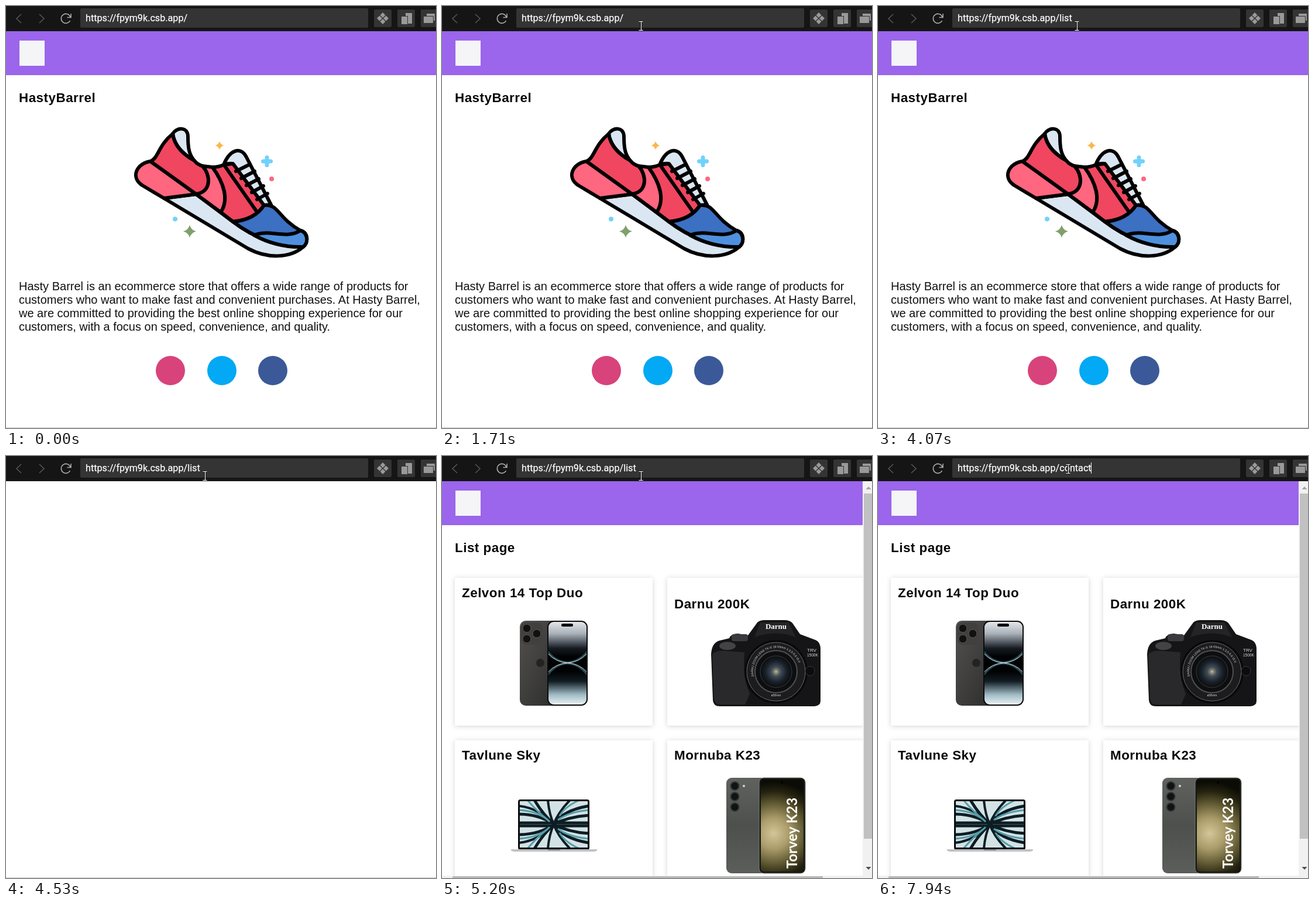
An HTML page that plays this animation: 735x720 px, repeating every 8000 ms.

```html
<!DOCTYPE html>
<html lang="en">
<head>
<meta charset="utf-8">
<title>Shop preview</title>
<style>
  html, body { margin: 0; width: 735px; height: 720px; overflow: hidden; background: #fff; }
  svg { display: block; }
  text { white-space: pre; }
  .head { font: bold 22.4px "Liberation Sans", Arial, sans-serif; letter-spacing: .5px; fill: #080808; }
  .body { font: 20px "Liberation Sans", Arial, sans-serif; fill: #111; }
  .url { font: 16.18px Roboto, sans-serif; fill: #fff; stroke: #fff; stroke-width: .25; }
  .ink { stroke: #000; stroke-width: 6; stroke-linejoin: round; stroke-linecap: round; }
  .card { fill: #fff; filter: drop-shadow(0 1px 4px rgba(0,0,0,.17)); }
</style>
</head>
<body>
<svg width="735" height="720" viewBox="0 0 735 720">
  <defs>
    <clipPath id="view"><path d="M0 43H719V716H0Z"/></clipPath>
    <clipPath id="phoneScreen"><rect x="182" y="283" width="65" height="141" rx="9"/></clipPath>
    <clipPath id="laptopScreen"><rect x="133" y="589" width="116" height="79"/></clipPath>
    <linearGradient id="graphite" x2="1" y2="1"><stop stop-color="#52514f"/><stop offset="1" stop-color="#2b2b2a"/></linearGradient>
    <linearGradient id="sage" x2="0" y2="1"><stop stop-color="#5f625f"/><stop offset=".5" stop-color="#4d504d"/><stop offset="1" stop-color="#5b5e5a"/></linearGradient>
    <linearGradient id="glow" x2="0" y2="1"><stop stop-color="#e3e6e9"/><stop offset=".14" stop-color="#aab2ba"/><stop offset=".32" stop-color="#161b22"/><stop offset=".42" stop-color="#010203"/><stop offset=".6" stop-color="#010203"/><stop offset=".72" stop-color="#121d24"/><stop offset=".88" stop-color="#9fbac4"/><stop offset="1" stop-color="#eaf2f4"/></linearGradient>
    <radialGradient id="olive" gradientUnits="userSpaceOnUse" cx="567" cy="644" r="88"><stop stop-color="#d5c598"/><stop offset=".3" stop-color="#aa9c6a"/><stop offset=".58" stop-color="#625b34"/><stop offset=".82" stop-color="#25230f"/><stop offset="1" stop-color="#0c0c06"/></radialGradient>
    <radialGradient id="lens"><stop stop-color="#d8c89a"/><stop offset=".1" stop-color="#8b8874"/><stop offset=".3" stop-color="#3e4c58"/><stop offset=".65" stop-color="#1b222a"/><stop offset="1" stop-color="#0b0c0e"/></radialGradient>
    <path id="ring" d="M533 376A40 40 0 1 1 611 376"/>
    <path id="spark" d="M0-1Q.2-.2 1 0Q.2.2 0 1Q-.2.2-1 0Q-.2-.2 0-1Z"/>
    <g id="feather" fill="none" stroke="#0d1d24">
      <path stroke-width="5" d="M133 626H249M131 611Q165 611 191 628Q218 615 251 613M158 587Q172 611 191 628Q208 604 251 597"/>
      <path stroke-width="4" d="M131 597Q164 600 191 628M181 587Q183 611 191 628Q199 607 219 587"/>
      <path stroke="#559da8" stroke-width="3" d="M131 604Q166 606 184 624M146 587Q162 606 181 621M198 621Q217 607 251 604M235 587Q210 598 201 614"/>
    </g>
  </defs>

  <g id="home">
    <path fill="#9b65ec" d="M0 43H735V118H0Z"/>
    <rect x="23" y="59" width="43" height="43" fill="#f5f5f7"/>
    <text class="head" x="22" y="164">HastyBarrel</text>

    <g class="ink">
      <path fill="#dae6f1" d="M270 328L325 321L388 368C426 397 465 410 508 411C485 431 446 431 414 414Z"/>
      <path fill="#ff667f" d="M247 265C225 268 211 291 233 306L270 328L325 321Z"/>
      <path fill="#dae6f1" d="M285 218C291 207 311 205 311 223C311 242 313 254 322 264C303 253 288 239 285 218Z"/>
      <path fill="#f04660" d="M247 265C261 259 260 238 285 218C288 240 304 254 322 264Q328 271 336 273C350 288 352 317 325 321Z"/>
      <path fill="#ff667f" d="M336 273L353 275C372 301 382 330 367 352L325 321C352 317 350 288 336 273Z"/>
      <path fill="#f04660" d="M353 275Q363 275 372 271L388 269L441 340C430 357 412 366 388 368L367 352C382 330 372 301 353 275Z"/>
      <path fill="#dae6f1" d="M372 271C382 246 401 238 411 258L453 339L441 340L388 269Q380 268 372 271Z"/>
      <path fill="#3c70c3" d="M388 368C412 366 430 357 441 340C466 337 464 361 503 383C517 386 517 404 508 411C465 410 426 397 388 368Z"/>
      <path fill="#4f90de" d="M424 391C450 380 480 399 503 383C517 387 517 404 508 411C475 412 446 403 424 391Z"/>
      <path fill="none" d="M374 273L428 350M393 282L417 270M402 294L425 282M411 306L432 295M420 318L440 307M429 330L447 320"/>
    </g>
    <use href="#spark" transform="translate(365 238) scale(7.5)" fill="#fbb74c"/>
    <use href="#spark" transform="translate(314 384.5) scale(11)" fill="#80a06b"/>
    <path d="M446 258.500V271.500M439.500 265H452.500" stroke="#72d1fb" stroke-width="7" stroke-linecap="round"/>
    <circle cx="454" cy="295" r="4" fill="#ff667f"/>
    <circle cx="289" cy="363.500" r="4" fill="#72d1fb"/>

    <g class="body">
      <text x="22" y="485">Hasty Barrel is an ecommerce store that offers a wide range of products for</text>
      <text x="22" y="508">customers who want to make fast and convenient purchases. At Hasty Barrel,</text>
      <text x="22" y="531">we are committed to providing the best online shopping experience for our</text>
      <text x="22" y="554">customers, with a focus on speed, convenience, and quality.</text>
    </g>
    <circle cx="281" cy="622" r="25" fill="#d8437c"/>
    <circle cx="369" cy="622" r="25" fill="#03a9f4"/>
    <circle cx="456" cy="622" r="25" fill="#3b5998"/>
  </g>
  <path id="baseline" fill="#c8c8c8" d="M0 719H735V720H0Z"/>

  <g id="list">
    <g clip-path="url(#view)">
      <path fill="#9b65ec" d="M0 43H719V118H0Z"/>
      <rect x="23" y="59" width="43" height="43" fill="#f5f5f7"/>
      <rect class="card" x="22" y="208" width="338" height="252"/>
      <rect class="card" x="385" y="208" width="338" height="252"/>
      <rect class="card" x="22" y="485" width="338" height="252"/>
      <rect class="card" x="385" y="485" width="338" height="252"/>
      <g class="head">
        <text x="22" y="164">List page</text>
        <text x="34" y="241">Zelvon 14 Top Duo</text>
        <text x="397" y="260">Darnu 200K</text>
        <text x="34" y="518">Tavlune Sky</text>
        <text x="397" y="518">Mornuba K23</text>
      </g>

      <!-- phone -->
      <rect x="133" y="281" width="70" height="145" rx="10" fill="url(#graphite)"/>
      <rect x="135" y="284" width="37" height="38" rx="9" fill="#41403e"/>
      <g fill="#111" stroke="#5c5a58"><circle cx="145" cy="294" r="7"/><circle cx="145" cy="312" r="7"/><circle cx="162" cy="303" r="7"/></g>
      <circle cx="168" cy="353" r="7" fill="#232323"/>
      <rect x="180" y="281" width="69" height="145" rx="11" fill="#0b0b0c"/>
      <g clip-path="url(#phoneScreen)" fill="none">
        <path fill="url(#glow)" d="M182 283H247V424H182Z"/>
        <path stroke="#3f7f92" stroke-width="3" opacity=".6" d="M181 334Q195 351 214.500 352Q234 351 248 334M181 373Q195 355 214.500 354Q234 355 248 373"/>
        <path stroke="#e6eef0" d="M181 337Q195 352 214.500 353Q234 352 248 337M181 369Q195 354 214.500 353Q234 354 248 369"/>
      </g>
      <rect x="204" y="286" width="20" height="5" rx="2.500"/>

      <!-- camera -->
      <path fill="#151517" d="M460 338Q461 319 474 315L491 311Q494 303 506 303L523 306L539 284Q543 280 552 280H585Q594 280 599 285L612 304L636 313Q647 316 647 330V418Q647 426 637 427H475Q464 427 463 417Z"/>
      <path fill="#29292b" d="M462 338Q470 330 490 333L517 335Q513 377 526 406L518 424H476Q466 424 465 414Z"/>
      <ellipse cx="488" cy="324" rx="14" ry="7" fill="#434345"/>
      <rect x="495" y="304" width="28" height="12" rx="4" fill="#3a3a3c"/>
      <path fill="#242426" d="M544 284H592L605 309Q571 296 534 309Z"/>
      <circle cx="571" cy="368" r="54" fill="#09090a"/>
      <circle cx="571" cy="368" r="50" fill="#1c1c1e" stroke="#6a6a6c"/>
      <circle cx="571" cy="368" r="36" fill="#0d0e10" stroke="#505052" stroke-width="2"/>
      <circle cx="571" cy="368" r="27" fill="url(#lens)" stroke="#3a3d42"/>
      <circle cx="629" cy="367" r="8" fill="#0c0c0c" stroke="#383838"/>
      <g fill="#ddd" font-family="Liberation Sans, sans-serif">
        <text x="571" y="295" text-anchor="middle" font-family="Liberation Serif, serif" font-size="13" font-weight="bold" fill="#fff">Darnu</text>
        <text x="624" y="334" font-size="8">TRV</text>
        <text x="624" y="342" font-size="6.500">1500K</text>
        <text font-size="5.200"><textPath href="#ring">DARNU ZOOM LENS TK-S 18-55mm 1:3.5-5.6 IS II</textPath></text>
        <text x="571" y="410" text-anchor="middle" font-size="5">ø58mm</text>
      </g>

      <!-- laptop -->
      <rect x="130" y="586" width="122" height="86" rx="4" fill="#0a0c0e"/>
      <g clip-path="url(#laptopScreen)">
        <path fill="#d3e2e5" d="M133 589H249V668H133Z"/>
        <use href="#feather"/>
        <use href="#feather" transform="matrix(1 0 0 -1 0 1257)"/>
      </g>
      <path fill="#bfc2c4" d="M118 671H265V673Q263 675 257 675H126Q120 675 118 673Z"/>
      <rect x="181" y="671" width="21" height="2" fill="#8d9092"/>

      <!-- second phone -->
      <rect x="486" y="549" width="80" height="163" rx="9" fill="url(#sage)"/>
      <g fill="#101214" stroke="#343836" stroke-width="2"><circle cx="500.500" cy="563" r="7"/><circle cx="500.500" cy="581" r="7"/><circle cx="500.500" cy="599" r="7"/></g>
      <circle cx="516" cy="563" r="2" fill="#d5d6cd"/>
      <rect x="542" y="549" width="79" height="163" rx="8" fill="#161715" stroke="#7b8175"/>
      <rect x="545" y="552" width="73" height="157" rx="5" fill="url(#olive)"/>
      <circle cx="581" cy="557" r="2"/>
      <text transform="translate(607 704) rotate(-90)" font-family="Lato, sans-serif" font-size="24" font-weight="bold" fill="#fff">Torvey K23</text>
    </g>

    <path fill="#f1f1f1" d="M719 43H735V720H0V716H719Z"/>
    <path fill="#c1c1c1" d="M721 64H735V653H721Z"/>
    <path fill="#a3a3a3" d="M724.500 57L729 52L733.500 57Z"/>
    <path fill="#505050" d="M724.500 701L729 706L733.500 701Z"/>
    <path fill="#b9b9b9" d="M18 717H651V720H18Z"/>
  </g>

  <!-- browser bar -->
  <path fill="#151515" d="M0 0H735V43H0Z"/>
  <g fill="none" stroke="#555" stroke-width="1.600">
    <path d="M26 14L18 21.500L26 29M57 14L65 21.500L57 29"/>
    <path stroke="#aaa" d="M110 19A8 8 0 1 0 109.500 25M111 13V19.500H104.500"/>
  </g>
  <rect x="127" y="4" width="492" height="33" rx="2" fill="#343434"/>
  <g fill="#343434">
    <rect x="629" y="6" width="30" height="30" rx="2"/>
    <rect x="669" y="6" width="30" height="30" rx="2"/>
    <rect x="709" y="6" width="30" height="30" rx="2"/>
  </g>
  <g fill="#999">
    <path d="M644 11L648.500 15.500L644 20L639.500 15.500ZM644 22L648.500 26.500L644 31L639.500 26.500ZM638.500 16.500L643 21L638.500 25.500L634 21ZM649.500 16.500L654 21L649.500 25.500L645 21Z"/>
    <path d="M683 12H694V30H687V17H683ZM676 18H686V31H676Z"/>
    <path d="M719 13H733V25H731V17H719ZM714 18H730V29H714Z"/>
  </g>

  <rect id="mark" x="311.500" y="11" width="22" height="19" fill="#3466b5"/>
  <text id="url" class="url" x="136" y="26"></text>
  <rect id="caret" y="11" width="1" height="19" fill="#fff"/>
  <circle id="ripple" r="15" fill="#fff"/>
  <path id="arrow" fill="#fff" stroke="#000" stroke-linejoin="round" d="M.5.5V16.500L4.300 13L6.700 18.800L9.300 17.700L7 12H11.500Z"/>
  <g id="beam" fill="none">
    <path stroke="#222" stroke-width="3" d="M-3.500-7.500H-1Q0-7.500 0-6.500Q0-7.500 1-7.500H3.500M0-7V7M-3.500 7.500H3.500"/>
    <path stroke="#fff" d="M-3.500-7.500H3.500M.5-7.500V7.500M-3.500 7.500H3.500"/>
  </g>
</svg>
<script>
  const el = id => document.getElementById(id);
  const show = (id, on) => el(id).setAttribute('visibility', on ? 'visible' : 'hidden');
  const place = (id, x, y) => el(id).setAttribute('transform', `translate(${x} ${y})`);
  const LOOP = 8000;

  // Each entry starts with the time from which it holds.
  const typed = [[0, ''], [3390, 'l'], [3470, 'lis'], [3540, 'list'], [7070, 'c'], [7200, 'co'],
    [7270, 'con'], [7410, 'cont'], [7540, 'conta'], [7740, 'contac'], [7940, 'contact']];
  const pointer = [[0, -50, -50], [170, 642, 702], [240, 560, 610], [310, 440, 480], [380, 340, 360],
    [450, 298, 262], [520, 258, 195], [590, 242, 150], [660, 265, 110], [730, 298, 80], [790, 324, 60],
    [860, 334, 48], [930, 340, 41], [990, 340, 34], [5270, 339, 32], [5340, 335, 29], [5410, 331, 26],
    [5480, 328, 24], [5550, 325, 22]];
  const ripples = [[0, 0, 0], [990, 9, .3], [1050, 12, .25], [1120, 15, .2], [1250, 15, .1], [1320, 0, 0],
    [6680, 12, .25], [6810, 15, .2], [7070, 0, 0]];
  const blinks = [1180, 1710, 2260, 2790, 3320, 4070, 4600, 5130, 5680, 6220, 7070];
  const held = (steps, t) => steps.findLast(s => s[0] <= t);

  function draw(t) {
    show('home', t < 4530);
    show('list', t >= 5200);
    show('baseline', t < 5200);

    el('url').textContent = 'https://fpym9k.csb.app/' + held(typed, t)[1];
    el('caret').setAttribute('x', Math.floor(136 + el('url').getComputedTextLength()));
    show('caret', blinks.filter(b => b <= t).length % 2);
    show('mark', t >= 6810 && t < 7070);

    const [, x, y] = held(pointer, t);
    show('arrow', t < 930);
    show('beam', t >= 930);
    place('arrow', x, y);
    place('beam', x, y);

    const [, r, alpha] = held(ripples, t);
    place('ripple', x - 2, y - .5);
    el('ripple').setAttribute('r', r);
    el('ripple').setAttribute('opacity', alpha);
  }

  const start = performance.now();
  (function frame() {
    draw((performance.now() - start) % LOOP);
    requestAnimationFrame(frame);
  })();
</script>
</body>
</html>
```
